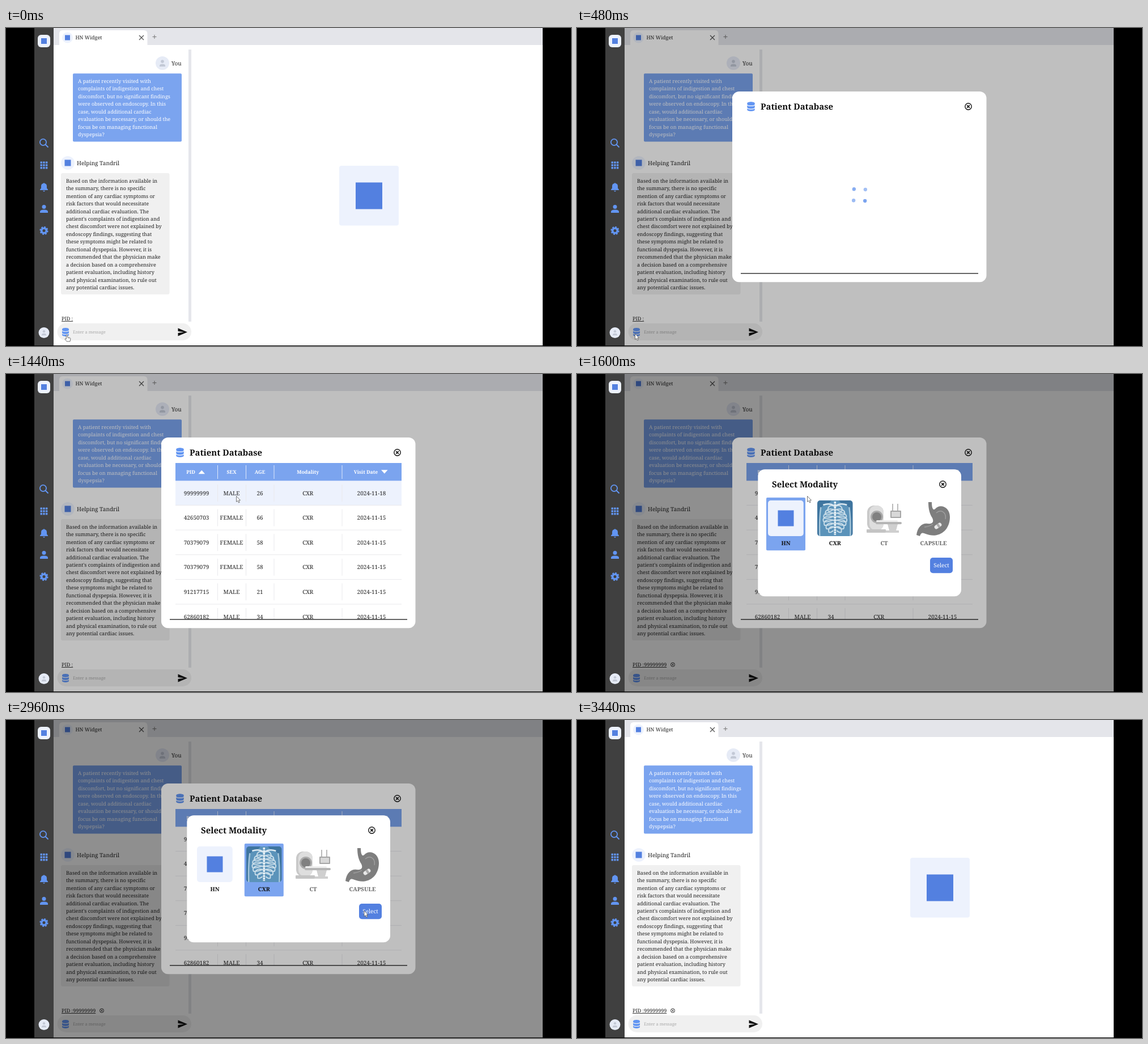
An HTML page that plays this animation: 997 by 561 pixels, repeating every 3.6 s.

```html
<!DOCTYPE html>
<html lang="en">
<head>
<meta charset="utf-8">
<title>Patient database</title>
<style>
  html, body { margin: 0; width: 100%; height: 100%; overflow: hidden; background: #000; }
  svg { display: block; font-family: "Noto Serif", serif; text-rendering: geometricPrecision; }
</style>
</head>
<body>
<svg id="stage" width="997" height="561" viewBox="0 0 997 561"></svg>
<script>
const BLUE = '#6295f2', DEEP = '#5380e0', SOFT = '#7ba4ef', PALE = '#edf2fd', GREY = '#f0f0f0';
const LOOP = 3600, STEP = 80;
const stage = document.getElementById('stage');

const range = n => [...Array(n).keys()];
const rect = (x, y, w, h, fill, r = 0, more = '') =>
  `<rect x="${x}" y="${y}" width="${w}" height="${h}" rx="${r}" fill="${fill}" ${more}/>`;
const circle = (x, y, r, fill, more = '') =>
  `<circle cx="${x}" cy="${y}" r="${r}" fill="${fill}" ${more}/>`;
const path = (d, fill, more = '') => `<path d="${d}" fill="${fill}" ${more}/>`;
const line = (d, color, width = 1, more = '') =>
  path(d, 'none', `stroke="${color}" stroke-width="${width}" ${more}`);
const text = (x, y, s, size = 8.97, fill = '#222', more = '') =>
  `<text x="${x}" y="${y}" font-size="${size}" fill="${fill}" ${more}>${s}</text>`;
const middle = (x, y, s, size, fill, weight = 400) =>
  text(x, y, s, size, fill, `text-anchor="middle" font-weight="${weight}"`);
const paragraph = (x, y, s, fill) =>
  s.split('|').map((row, i) => text(x, y + i * 13.45, row, 8.97, fill)).join('');
const at = (x, y, body, scale = 1) => `<g transform="translate(${x} ${y}) scale(${scale})">${body}</g>`;
const group = (id, body) => `<g id="${id}">${body}</g>`;

const mark = (x, y, side) => rect(x - side / 2, y - side / 2, side, side, DEEP);
const database = (x, y, back, scale) => at(x, y,
  path('M-6-5C-6-8.3 6-8.3 6-5V5C6 8.3-6 8.3-6 5Z', BLUE) +
  line('M-6.5-3.2C-5-.2 5-.2 6.5-3.2M-6.5 1.8C-5 4.8 5 4.8 6.5 1.8', back, 1.1), scale);
const person = 'M-5 6V4.6Q-5 1.6 0 1.6T5 4.6V6Z';
const avatar = (x, y, r) => at(x, y, circle(0, 0, 12, '#e6ebf6') +
  at(0, 0, circle(0, -3, 2.8, '#c3c9d6') + path(person, '#c3c9d6')), r / 12);
const closeRing = (x, y, r) => {
  const k = r * .42;
  return circle(x, y, r, 'none', `stroke="#111" stroke-width="${r * .24}"`) +
    line(`M${x - k} ${y - k}l${2 * k} ${2 * k}m0 ${-2 * k}l${-2 * k} ${2 * k}`, '#111', r * .27);
};

const sidebar = () => rect(50, 0, 34, 560, '#404040') +
  rect(56, 12, 22, 22, PALE, 6) + mark(67, 23, 10) +
  circle(65.5, 201.5, 5.6, 'none', `stroke="${BLUE}" stroke-width="1.8"`) +
  line('M69.5 205.5l5 5', BLUE, 2) +
  range(9).map(i => rect(60.5 + i % 3 * 4.7, 235.5 + (i / 3 | 0) * 4.7, 3.5, 3.5, BLUE, .5)).join('') +
  path('M60 286V285L62 282.500V279Q62 275 65.700 274.300Q67 272 68.300 274.300Q72 275 72 279V282.500L74 285V286ZM65 287H69Q67 290.500 65 287Z', BLUE) +
  circle(67, 315.5, 3.5, BLUE) + path('M60 326V324Q60 320.500 67 320.500T74 324V326Z', BLUE) +
  circle(67, 357.5, 4.3, 'none', `stroke="${BLUE}" stroke-width="3.6"`) +
  circle(67, 357.5, 6.6, 'none', `stroke="${BLUE}" stroke-width="2" stroke-dasharray="3 2.18"`) +
  avatar(67, 537.5, 9.5);

const question = 'A patient recently visited with|complaints of indigestion and chest|' +
  'discomfort, but no significant findings|were observed on endoscopy. In this|' +
  'case, would additional cardiac|evaluation be necessary, or should the|' +
  'focus be on managing functional|dyspepsia?';
const answer = 'Based on the information available in|the summary, there is no specific|' +
  'mention of any cardiac symptoms or|risk factors that would necessitate|' +
  'additional cardiac evaluation. The|patient\'s complaints of indigestion and|' +
  'chest discomfort were not explained by|endoscopy findings, suggesting that|' +
  'these symptoms might be related to|functional dyspepsia. However, it is|' +
  'recommended that the physician make|a decision based on a comprehensive|' +
  'patient evaluation, including history|and physical examination, to rule out|' +
  'any potential cardiac issues.';

const page = () => rect(84, 0, 863, 560, '#fff') + rect(84, 0, 863, 30, '#e4e5ea') +
  path('M94 30V10Q94 4 100 4H243Q249.500 4 249.500 10V30Z', '#fff') +
  circle(108.5, 17, 9.5, PALE) + mark(108.5, 17, 9) + text(122.5, 20.4, 'HN Widget') +
  line('M235 13l8 8m0-8l-8 8', '#555', 1.3) + line('M258.500 15.500h7m-3.500-3.500v7', '#777') +
  rect(322, 38, 5, 480, '#e5e6eb') +
  avatar(276, 62, 12) + text(292, 66, 'You', 9.97) +
  rect(118, 80.3, 192, 120.3, SOFT, 2) + paragraph(127, 97, question, '#fff') +
  circle(109, 238, 12, PALE) + mark(109, 238, 11) + text(125, 241.8, 'Helping Tandril', 9.97) +
  rect(97, 256, 191.5, 214, GREY, 3) + paragraph(106, 272.7, answer) +
  `<text id="pid" x="98" y="516" font-size="8.97" fill="#222" text-decoration="underline"></text>` +
  group('clearPid', closeRing(169, 512.7, 3.5)) +
  rect(90.5, 521, 236.5, 30, GREY, 15) + database(105, 536.5, GREY, 1) +
  text(118, 539, 'Enter a message', 7.47, '#a8a8a8') +
  path('M303.500 529.500L320 536.500L303.500 543.500V538L314 536.500L303.500 535Z', '#111') +
  rect(588, 243, 105, 105.5, PALE, 4) + mark(640.5, 296, 47);

const columns = [336, 398, 448, 532.8, 645], borders = [373.5, 423.5, 473, 593];
const rowTop = 188, rowHeight = 43.6;
const patients = ['99999999 MALE 26 18', '42650703 FEMALE 66 15', '70379079 FEMALE 58 15',
  '70379079 FEMALE 58 15', '91217715 MALE 21 15', '62860182 MALE 34 15'];

const patientRow = (patient, i) => {
  const [pid, sex, age, day] = patient.split(' '), y = rowTop + i * rowHeight;
  return rect(299, y, 399, rowHeight, PALE, 0, 'class="hover"') +
    borders.map(x => line(`M${x} ${y + 7}v30`, '#e9e9ec')).join('') +
    line(`M299 ${y + rowHeight}h399`, '#e9e9ec') +
    [pid, sex, age, 'CXR', '2024-11-' + day].map((s, c) => middle(columns[c], y + 25.6, s, 9.97, '#222')).join('');
};

const table = () => `<clipPath id="tableClip">${rect(299, 157, 399, 276, '#000')}</clipPath>` +
  `<g clip-path="url(#tableClip)">${patients.map(patientRow).join('')}</g>` +
  rect(299, 157, 399, 31.3, SOFT) +
  borders.map(x => line(`M${x} 161v24`, '#dfe8fb')).join('') +
  ['PID', 'SEX', 'AGE', 'Modality', 'Visit Date'].map((s, c) =>
    middle(columns[c] - [10, 0, 0, 0, 10][c], 176, s, 8.7, '#fff', 600)).join('') +
  path('M339.500 176.300L345.300 169.800L351.100 176.300ZM662 169.300H673.600L667.800 175.800Z', '#fff');

const dim = () => rect(84, 0, 863, 560, '#000', 0, 'opacity=".25"');
const databaseDialog = () => dim() + rect(274, 112, 448.5, 336.3, '#fff', 12) +
  database(307, 138.5, '#fff', 1.12) +
  text(324, 143.9, 'Patient Database', 14.95, '#111', 'font-weight="700"') + closeRing(690.5, 138.5, 5.7) +
  group('spinner', range(4).map(i => circle(10, 10, 3.2, SOFT,
    `transform="rotate(${i * 90})" opacity="${[1, .75, .9, .7][i]}"`)).join('')) +
  group('table', table()) + line('M289 433h419', '#333', 1.6);

const chest = () => {
  const rib = i => {
    const y = 234 + i * 6.2, w = 12 + Math.sin(i * .55) * 8;
    return `M0 ${y}C${w * .7} ${y - 5} ${w * 1.2} ${y + 1} ${w} ${y + 8}Q${w * .7} ${y + 9} 3 ${y + 5}`;
  };
  const half = line(range(7).map(rib).join(''), '#c9dde9', 1.9) +
    line('M2 232Q10 227 21 231', '#dce9f1', 2.5) + line('M25 235Q28 255 27 286', '#a5c6da', 2.4);
  return rect(424, 223, 62.5, 63, '#3f759f', 5) +
    path('M429 286V243Q429 231 444 229L449 223H462L467 229Q482 231 482 243V286Z', '#5b93ba') +
    at(455.3, 0, half) + `<g transform="translate(455.3 0) scale(-1 1)">${half}</g>` +
    line('M455.300 225V284', '#e6f0f5', 3.6, 'stroke-dasharray="3.6 .8"');
};
const scanner = () => rect(512, 232, 29, 44, '#c9c9c9', 12) + rect(516, 232, 25, 44, '#dedede', 12) +
  circle(529, 252, 11, '#aaa') + circle(529, 252, 8, '#808080') +
  rect(511, 274, 34, 6, '#c4c4c4', 1) + rect(528, 258, 38, 3, '#eee', 1.5) +
  rect(527, 261, 46, 4, '#b5b5b5', 2) + path('M548 265H566L563 276H568V280H545V276H551Z', '#cfcfcf') +
  line('M557 229v13m9-13v13', '#aaa', 1.6) + rect(553, 241, 19, 13, '#a6a6a6', 1) + rect(555, 243, 15, 9, '#d8d8d8');
const stomach = () =>
  path('M620 226H626C626 238 629 241 632 238C640 228 658 234 658 252C658 276 640 288 622 284C613 282 608 276 605 286L599 284C601 268 611 262 619 264C628 265 630 260 627 254C622 246 620 238 620 226Z', '#7e7e7e') +
  line('M634 245C644 237 652 246 650 256M613 270Q622 269 628 265', '#a0a0a0', 1.5) +
  `<g transform="translate(637 268) rotate(-35)">${rect(-7, -3.5, 14, 7, '#e8e8e8', 3.5)}${rect(-1, -3.5, 4, 7, '#aaa')}</g>`;

const tiles = [368.5, 455.3, 542, 629];
const modalityDialog = () => dim() + rect(319.3, 168.2, 358.7, 224, '#fff', 12) +
  text(344, 199.9, 'Select Modality', 14.95, '#111', 'font-weight="700"') + closeRing(645.5, 194.5, 5.7) +
  `<rect id="chosen" y="218" width="69" height="93.3" rx="2" fill="${SOFT}"/>` +
  rect(337, 223, 62.7, 63, PALE, 5) + mark(368.5, 254.5, 28) + chest() + scanner() + stomach() +
  ['HN', 'CXR', 'CT', 'CAPSULE'].map((s, i) => middle(tiles[i], 302, s, 9.97, i < 2 ? '#111' : '#666', 700)).join('') +
  rect(623, 324, 40, 27.3, DEEP, 5) + middle(643, 341.3, 'Select', 9.97, '#fff');

const outline = 'stroke="#555" stroke-width=".8" stroke-linejoin="round"';
const cursor = () =>
  group('arrow', path('M0 0V10L2.300 8L4 11.600L5.700 10.800L4.100 7.300H7Z', '#fff', outline)) +
  group('hand', path('M-1.200 1Q-.200-.600 .800 1V5L5.200 6Q6.600 6.500 6.300 8.300L5.500 12.500H-.300L-3.300 8.800Q-3.600 7.200-2.200 7.600L-1.200 8.600Z', '#fff', outline) +
    line('M2.400 5.500v2m1.700-1.700v2', '#777', .5));

stage.innerHTML = group('page', page()) + sidebar() + group('databaseDialog', databaseDialog()) +
  group('modalityDialog', modalityDialog()) + group('cursor', cursor());

const $ = id => document.getElementById(id);
const show = (el, on) => el.setAttribute('display', on ? 'inline' : 'none');
const between = (t, a, b) => t >= a && t < b;

// time, x, y of the pointer tip
const route = [[0, 107.5, 540.5], [400, 107.5, 540.5], [480, 102.5, 539.5], [960, 409, 223],
  [1040, 409, 223], [1120, 406.5, 216.5], [1200, 406.5, 215.5], [1600, 406.5, 215.5],
  [2000, 487, 273], [2160, 487, 273], [2240, 489.5, 274], [2640, 637, 339],
  [2880, 637, 339], [2960, 632, 336.5], [LOOP, 632, 336.5]];
const handTimes = [[0, 480], [880, 1120], [1760, 2320], [2560, 2960]];

function pointer(t) {
  const i = route.findIndex(key => key[0] > t);
  const [t0, x0, y0] = route[i - 1], [t1, x1, y1] = route[i];
  const u = (t - t0) / (t1 - t0), k = u * u * (3 - 2 * u);
  return [x0 + (x1 - x0) * k, y0 + (y1 - y0) * k];
}

function draw() {
  const t = Math.floor(performance.now() % LOOP / STEP) * STEP;
  const [x, y] = pointer(t);
  const tableOn = t >= 720, picking = between(t, 1600, 3040);

  show($('databaseDialog'), between(t, 480, 3040));
  show($('modalityDialog'), picking);
  show($('table'), tableOn);
  show($('spinner'), !tableOn);
  $('spinner').setAttribute('transform', `translate(498.5 294.6) rotate(${(t - 480) * .3 + 2})`);

  const hovered = Math.floor((y - rowTop) / rowHeight);
  document.querySelectorAll('.hover').forEach((row, i) => show(row, !picking && i === hovered));
  $('chosen').setAttribute('x', tiles[t < 1840 ? 0 : 1] - 34.5);

  $('pid').textContent = t < 1600 ? 'PID :' : 'PID :99999999';
  show($('clearPid'), t >= 1600);

  const hand = handTimes.some(([a, b]) => between(t, a, b));
  show($('cursor'), t < 3040);
  show($('hand'), hand);
  show($('arrow'), !hand);
  $('cursor').setAttribute('transform', `translate(${x} ${y})`);
  requestAnimationFrame(draw);
}
draw();
</script>
</body>
</html>
```
